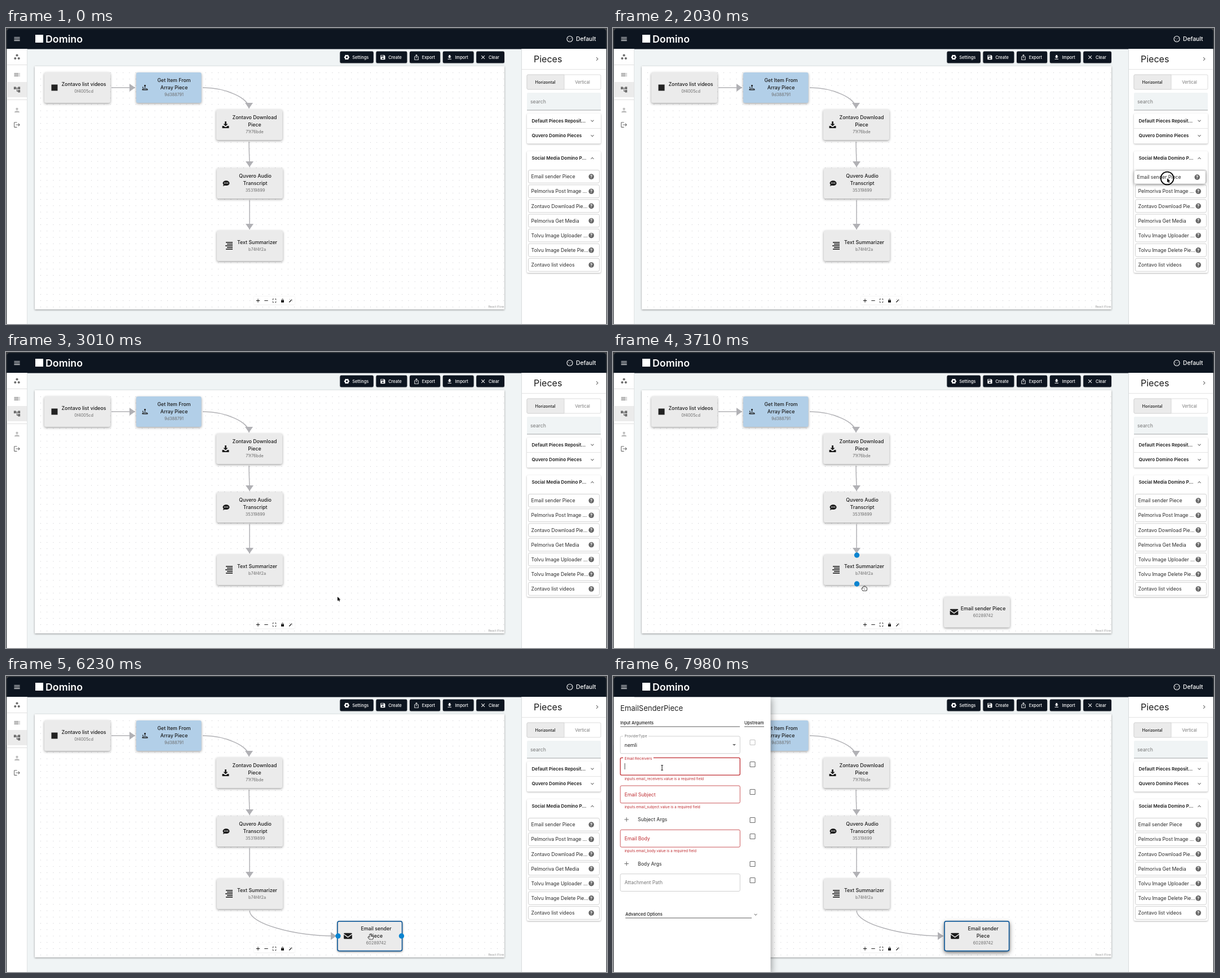
Recreate the animation shown at these times as an HTML page with a canvas. Size 1066 by 526 pixels, loop 8000 ms.

```html
<!DOCTYPE html>
<html lang="en">
<head>
<meta charset="utf-8">
<title>Workflow editor</title>
<style>
html, body { margin: 0; width: 100%; height: 100%; overflow: hidden; background: #f0f4f5; }
canvas { display: block; width: 1066px; height: 526px; }
</style>
</head>
<body>
<canvas id="stage"></canvas>
<script>
const W = 1066, H = 526, LOOP = 8000, STEP = 70;
const canvas = document.getElementById('stage');
const c = canvas.getContext('2d');
const dpr = window.devicePixelRatio || 1;
canvas.width = W * dpr;
canvas.height = H * dpr;

const INK = '#1c1c1c', DARK = '#0d1520', RED = '#bf2c31', BLUE = '#0a84d0', EDGE = '#b1b1b5', GREY = '#6c6c6c';

const ICONS = {
  menu: 'M3 18h18v-2H3zM3 13h18v-2H3zM3 6v2h18V6z',
  toc: 'M3 9h14V7H3zM3 13h14v-2H3zM3 17h14v-2H3zM19 17h2v-2h-2zM19 7v2h2V7zM19 13h2v-2h-2z',
  tree: 'M22 11V3h-7v3H9V3H2v8h7V8h2v10h4v3h7v-8h-7v3h-2V8h2v3z',
  person: 'M12 12a4 4 0 1 0 0-8 4 4 0 0 0 0 8zm0 2c-2.7 0-8 1.3-8 4v2h16v-2c0-2.7-5.3-4-8-4z',
  logout: 'M17 7l-1.4 1.4L18.2 11H8v2h10.2l-2.6 2.6L17 17l5-5zM4 5h8V3H4a2 2 0 0 0-2 2v14a2 2 0 0 0 2 2h8v-2H4z',
  save: 'M17 3H5a2 2 0 0 0-2 2v14a2 2 0 0 0 2 2h14a2 2 0 0 0 2-2V7zM12 19a3 3 0 1 1 0-6 3 3 0 0 1 0 6zM15 9H5V5h10z',
  share: 'M16 5l-1.4 1.4-1.6-1.6V16h-2V4.8L9.4 6.4 8 5l4-4zM20 10v11a2 2 0 0 1-2 2H6a2 2 0 0 1-2-2V10a2 2 0 0 1 2-2h3v2H6v11h12V10h-3V8h3a2 2 0 0 1 2 2z',
  load: 'M5 20h14v-2H5zM19 9h-4V3H9v6H5l7 7z',
  clear: 'M19 6.4L17.6 5 12 10.6 6.4 5 5 6.4 10.6 12 5 17.6 6.4 19 12 13.4 17.6 19 19 17.6 13.4 12z',
  more: 'M16.6 8.6L12 13.2 7.4 8.6 6 10l6 6 6-6z',
  plus: 'M19 13h-6v6h-2v-6H5v-2h6V5h2v6h6z',
  minus: 'M19 13H5v-2h14z',
  mail: 'M1 6a2 2 0 0 1 2-2h18a2 2 0 0 1 2 2l-11 8zM1 8.5l11 8 11-8V18a2 2 0 0 1-2 2H3a2 2 0 0 1-2-2z',
  chat: 'M12 3C6 3 1 6.6 1 11.2c0 2 .9 3.8 2.4 5.2C3 18.5 1.5 20.5 1 21c2.5 0 4.6-.9 6-2 1.5.5 3.2.6 5 .6 6 0 11-3.6 11-8.2S18 3 12 3z',
  tray: 'M9.5 1h5v8h5L12 16.5 4.5 9h5zM1 15.5h5l4 4h4l4-4h5V23H1z',
  pick: 'M12 1a3.5 3.5 0 0 1 1 6.8V14h5l5 4v4H1v-4l5-4h5V7.8A3.5 3.5 0 0 1 12 1zM7 16l-3 2.5h16L17 16zM4 8l3 3H5v3H3v-3H1z',
  fit: 'M3 3h6v2H5v4H3zM15 3h6v6h-2V5h-4zM3 15h2v4h4v2H3zM19 15h2v6h-6v-2h4z',
  lock: 'M5 10h2V8a5 5 0 0 1 10 0v2h2v11H5zM9 10h6V8a3 3 0 0 0-6 0z',
  wand: 'M3 19L14 8l2.5 2.5-11 11zM15 7l2-2 2.5 2.5-2 2zM19 1v4M7 4l3 1-2 2zM19 12l3 1-2 2z',
  drop: 'M6 9h12l-6 6z'
};
for (const k in ICONS) ICONS[k] = new Path2D(ICONS[k]);

function text(s, x, y, size, color = INK, weight = 400, align = 'left') {
  c.font = `${weight} ${size}px Inter, "Open Sans", sans-serif`;
  c.fillStyle = color;
  c.textAlign = align;
  c.fillText(s, x, y + size * 0.36);
}

function icon(name, x, y, size, color = INK, turn = 0) {
  c.save();
  c.translate(x, y);
  c.rotate(turn);
  c.scale(size / 24, size / 24);
  c.translate(-12, -12);
  c.fillStyle = color;
  c.fill(ICONS[name], 'evenodd');
  c.restore();
}

function box(x, y, w, h, r, fill, stroke, lw = 1) {
  c.beginPath();
  c.roundRect(x, y, w, h, r);
  if (fill) { c.fillStyle = fill; c.fill(); }
  if (stroke) { c.strokeStyle = stroke; c.lineWidth = lw; c.stroke(); }
}

function shaded(blur, dy, alpha, draw) {
  c.save();
  c.shadowColor = `rgba(0,0,0,${alpha})`;
  c.shadowBlur = blur * dpr;
  c.shadowOffsetY = dy * dpr;
  draw();
  c.restore();
}

function line(x1, y1, x2, y2, color, lw = 1) {
  c.beginPath();
  c.moveTo(x1, y1);
  c.lineTo(x2, y2);
  c.strokeStyle = color;
  c.lineWidth = lw;
  c.stroke();
}

function dot(x, y, r, color) {
  c.beginPath();
  c.arc(x, y, r, 0, 7);
  c.fillStyle = color;
  c.fill();
}

function ring(x, y, r, color, lw) {
  c.beginPath();
  c.arc(x, y, r, 0, 7);
  c.strokeStyle = color;
  c.lineWidth = lw;
  c.stroke();
}

function helpIcon(x, y) {
  dot(x, y, 4.8, '#666');
  text('?', x, y, 7.5, '#fff', 700, 'center');
}

function header() {
  c.fillStyle = '#3b3e42';
  c.fillRect(0, 0, W, H);
  box(1.5, 37, 1063, 489, 0, '#f0f4f5');
  box(1.5, 1.5, 1063, 36, [5, 5, 0, 0], DARK);
  icon('menu', 19.5, 19.5, 13.5, '#fff');
  c.fillStyle = '#fff';
  c.fillRect(52, 12, 14, 14);
  text('Domino', 70, 19.5, 17.8, '#fff', 600);
  ring(1000, 19.5, 5, '#fff', 1.1);
  for (const [x, y] of [[-2, -1], [2, -1], [0, 2]]) dot(1000 + x, 19.5 + y, 0.6, '#fff');
  text('Default', 1011, 19.5, 10.3, '#fff', 500);
}

function sidebar() {
  c.fillStyle = '#fff';
  c.fillRect(1.5, 37, 36, 489);
  c.fillStyle = '#ebebeb';
  c.fillRect(1.5, 96, 36, 27);
  line(37.5, 37, 37.5, H, '#dfe2e3');
  line(2, 65.5, 37, 65.5, '#e0e0e0');
  line(2, 127.5, 37, 127.5, '#e0e0e0');
  for (const [x, y] of [[19.5, 48.5], [16.3, 54], [22.7, 54]]) dot(x, y, 2.1, GREY);
  icon('toc', 19.5, 83, 13.5, GREY);
  icon('tree', 19.5, 109.5, 13.5, GREY);
  icon('person', 19.5, 146, 13, '#bdbdbd');
  icon('logout', 19.5, 172, 13, GREY);
}

function toolbar() {
  const buttons = [['Settings', 592.4, 59.4], ['Create', 656.4, 55, 'save'], ['Export', 716, 54.2, 'share'],
    ['Import', 774.8, 54.8, 'load'], ['Clear', 834.2, 49.8, 'clear']];
  for (const [label, x, w, name] of buttons) {
    shaded(2, 0.8, 0.3, () => box(x, 41.6, w, 20.6, 2.3, DARK));
    if (name) icon(name, x + 12, 52, 11, '#fff');
    else {
      ring(x + 12, 52, 2.8, '#fff', 2.2);
      for (let a = 0; a < 6.2; a += Math.PI / 3) {
        const p = Math.cos(a), q = Math.sin(a);
        line(x + 12 + p * 3, 52 + q * 3, x + 12 + p * 4.6, 52 + q * 4.6, '#fff', 2);
      }
    }
    text(label, x + 21.8, 52, 7.4, '#fff', 500);
  }
}

function board() {
  shaded(3, 1, 0.4, () => { c.fillStyle = '#fff'; c.fillRect(51, 68, 833, 432); });
  const gap = 11.25;
  for (let y = 79.5; y < 500; y += gap)
    for (let x = 61.5; x < 884; x += gap) dot(x, y, 0.55, '#bdbdc2');
  text('React Flow', 883, 495, 5.3, '#999', 400, 'right');
}

function controls() {
  shaded(2, 0, 0.1, () => { c.fillStyle = '#fff'; c.fillRect(440, 477, 72, 14.5); });
  ['plus', 'minus', 'fit', 'lock', 'wand'].forEach((n, i) =>
    icon(n, 447 + i * 14.5, 484.5, i < 2 ? 11 : 8.5, '#111'));
}

function node(x, y, w, h, cx, lines, id, fill = '#ebebeb') {
  shaded(4, 1.5, 0.38, () => box(x, y, w, h, 3, fill));
  const top = y + h / 2 - (lines.length - 1) * 6.4 - 6.6;
  lines.forEach((s, i) => text(s, cx, top + i * 12.7, 8.8, INK, 500, 'center'));
  text(id, cx, top + lines.length * 12.7, 7.3, '#6d6d6d', 400, 'center');
}

function curve(x1, y1, ax, ay, bx, by, x2, y2) {
  c.beginPath();
  c.moveTo(x1, y1);
  c.bezierCurveTo(ax, ay, bx, by, x2, y2);
  c.strokeStyle = EDGE;
  c.lineWidth = 1.5;
  c.stroke();
}

function arrowHead(x, y, turn) {
  c.save();
  c.translate(x, y);
  c.rotate(turn);
  c.beginPath();
  c.moveTo(0, 0);
  c.lineTo(-10, -7);
  c.lineTo(-10, 7);
  c.fillStyle = EDGE;
  c.fill();
  c.restore();
}

// Each control point sits halfway along the axis its end leaves on.
function edge(x1, y1, x2, y2, outDown, inDown) {
  const mx = (x1 + x2) / 2, my = (y1 + y2) / 2;
  curve(x1, y1, outDown ? x1 : mx, outDown ? my : y1, inDown ? x2 : mx, inDown ? my : y2, x2, y2);
}

function arrow(x1, y1, x2, y2, outDown, inDown) {
  edge(x1, y1, x2, y2, outDown, inDown);
  arrowHead(x2, y2, inDown ? Math.PI / 2 : 0);
}

function graph() {
  arrow(187, 106, 229, 106, false, false);
  arrow(349, 106, 431, 143, false, true);
  arrow(431, 202, 432, 247, true, true);
  arrow(432, 306, 432, 358, true, true);

  node(68, 79, 117, 54, 138, ['Zontavo list videos'], '0f4005cd');
  c.fillStyle = '#222';
  c.fillRect(80.5, 100.5, 11, 11);
  node(231, 79, 115.5, 54, 298, ['Get Item From', 'Array Piece'], '9d388791', '#b2cfe8');
  icon('pick', 246.5, 106, 11);
  node(373, 145, 117, 54, 441, ['Zontavo Download', 'Piece'], '71f76bde');
  icon('tray', 389.5, 172, 13);
  node(374, 249, 117, 54, 442, ['Quvero Audio', 'Transcript'], '35319899');
  icon('chat', 390.5, 276, 13);
  for (let i = -1; i < 2; i++) dot(390.5 + i * 2.7, 275.5, 0.9, '#ebebeb');
  node(374, 360, 117, 54, 445.5, ['Text Summarizer'], 'b74f4f2a');
  for (let i = 0; i < 5; i++) {
    const left = i === 2 ? 389 : i % 2 ? 392 : 390;
    line(left, 381 + i * 3, 402, 381 + i * 3, INK, 1.6);
  }
}

function handles(...points) {
  for (const [x, y] of points) dot(x, y, 4.7, BLUE);
}

function emailNode(t) {
  if (t < 3080) return;
  if (t < 6160) node(587, 435, 117, 54.5, 656.5, ['Email sender Piece'], '60289742');
  else {
    const glow = Math.min(1, Math.max(0, (t - 6230) / 210));
    shaded(3 + 7 * glow, 1 + 2 * glow, 0.2 + 0.25 * glow, () => box(588, 436, 115, 53, 3, '#ebebeb'));
    node(588, 435.5, 115, 53, 656.5, ['Email sender', 'Piece'], '60289742');
    box(588, 435.8, 114.6, 52.8, 3, null, '#165e9c', 1.7);
  }
  icon('mail', t < 6160 ? 605 : 606.5, 462, 16);
}

function item(label, x, y, lifted) {
  if (lifted) shaded(6, 1.5, 0.4, () => box(x, y, 126, 23, 2.5, '#fff'));
  box(x, y, 126, 23, 2.5, '#fff', lifted ? '#ddd' : '#c6c6c6', 0.8);
  text(label, x + 5, y + 11.6, 8.7, '#2b2b2b');
  helpIcon(x + 111.7, y + 11.6);
}

function panel() {
  c.fillStyle = '#fff';
  c.fillRect(914.5, 37, 150, 489);
  line(914.5, 37, 914.5, H, '#d9dcdd');
  text('Pieces', 936, 55.5, 16, INK);
  icon('more', 1048.5, 55, 13, GREY, -Math.PI / 2);
  line(915, 73.5, 1064, 73.5, '#e4e4e4');

  box(924, 83, 131, 26, 2, '#fff', '#dcdcdc');
  box(924, 83, 66, 26, [2, 0, 0, 2], '#ebebeb', '#d6d6d6');
  text('Horizontal', 956.5, 96, 7.3, INK, 500, 'center');
  text('Vertical', 1022.5, 96, 7.4, '#777', 400, 'center');

  box(924, 115, 131, 31, [2, 2, 0, 0], '#f0f4f5');
  line(924, 146, 1055, 146, '#8b8f91', 0.8);
  text('search', 930, 130.5, 8.7, '#777');

  shaded(3, 1, 0.3, () => box(924, 152, 131, 53.5, 2, '#fff'));
  line(924, 178.5, 1055, 178.5, '#e4e4e4');
  shaded(3, 1, 0.3, () => box(924, 219, 131, 216, 2, '#fff'));
  ['Default Pieces Reposit...', 'Quvero Domino Pieces', 'Social Media Domino P...'].forEach((s, i) => {
    const y = [165, 191.5, 231.5][i];
    text(s, 932.5, y, 8.1, INK, 600);
    icon('more', 1040, y, 11.5, GREY, i === 2 ? Math.PI : 0);
  });
  ['Email sender Piece', 'Pelmoriva Post Image ...', 'Zontavo Download Pie...', 'Pelmoriva Get Media',
    'Tolvu Image Uploader ...', 'Tolvu Image Delete Pie...', 'Zontavo list videos']
    .forEach((s, i) => item(s, 926.5, 252.5 + i * 26.15));
}

function notchLabel(s, y, color, size) {
  c.font = `400 ${size}px Inter, "Open Sans", sans-serif`;
  c.fillStyle = '#fff';
  c.fillRect(18, y - 4, c.measureText(s).width + 5, 8);
  text(s, 20.5, y, size, color);
}

function field(y, label, color, border, lw = 0.8) {
  box(13, y, 212.3, 30.8, 2.3, '#fff', border, lw);
  text(label, 20.5, y + 15.5, 8.65, color);
}

function drawer(t) {
  if (t < 6580) return;
  c.save();
  c.beginPath();
  c.rect(1.5, 37.5, W, H);
  c.clip();
  shaded(12, 3, 0.45, () => { c.fillStyle = '#fff'; c.fillRect(1.5, 37, 278, 489); });
  c.restore();

  text('EmailSenderPiece', 13, 57.5, 13, '#222');
  text('Input Arguments', 13, 83, 7.45, INK, 500);
  text('Upstream', 233, 83, 7.45, INK, 500);
  line(13, 90, 225, 90, '#333', 0.8);
  line(233, 90, 268, 90, '#333', 0.8);

  field(107, '', INK, '#c4c4c4');
  notchLabel('ProviderType', 107, '#777', 6.4);
  text('nemli', 20.5, 122.5, 8.8, '#222');
  icon('drop', 215, 122.5, 12, GREY);

  const focus = Math.min(1, Math.max(0, (t - 7700) / 210));
  field(145.3, '', RED, RED, focus ? 1.3 : 0.8);
  const size = 8.65 - 2.1 * focus, labelY = 161 - 14.7 * focus;
  if (focus === 1) notchLabel('Email Receivers', labelY, RED, size);
  else text('Email Receivers', 20.5, labelY, size, RED);
  if (focus) line(21, 155, 21, 166, '#222', 0.8);

  field(195, 'Email Subject', RED, RED);
  field(273.3, 'Email Body', RED, RED);
  field(351.7, 'Attachment Path', '#777', '#c4c4c4');
  ['receivers', 'subject', 'body'].forEach((s, i) =>
    text(`inputs.email_${s}.value is a required field`, 20.5, [183, 232.5, 311][i], 6.45, RED));
  ['Subject Args', 'Body Args'].forEach((s, i) => {
    const y = 255 + i * 78.5;
    icon('plus', 24, y, 13, GREY);
    text(s, 44, y, 8.65, '#222');
  });
  [118, 157, 206, 256, 285, 334, 363].forEach((y, i) =>
    box(243, y - 4.5, 9, 9, 1, null, i ? GREY : '#c4c4c4', 1.1));
  text('Advanced Options', 22, 423, 7.45, INK, 500);
  line(22, 430, 246, 430, '#333', 0.8);
  icon('more', 253, 424, 11, GREY);
}

// time, x, y
const PATH = [[350, 607, 530], [1050, 993, 263], [1890, 993, 263], [2030, 983, 267],
  [2870, 588, 435], [3010, 588, 435], [3710, 446, 421], [3850, 433, 412], [4130, 433, 412],
  [4620, 556, 470], [4760, 560, 471], [5110, 584, 471], [5390, 584, 471], [5810, 647, 464],
  [6860, 647, 464], [7700, 87, 171], [7910, 87, 163]];

function pointerAt(t) {
  let i = 0;
  while (i < PATH.length - 1 && PATH[i + 1][0] <= t) i++;
  const a = PATH[i], b = PATH[i + 1] || a;
  const u = b === a ? 0 : Math.max(0, (t - a[0]) / (b[0] - a[0]));
  const e = u * u * (3 - 2 * u);
  return [a[1] + (b[1] - a[1]) * e, a[2] + (b[2] - a[2]) * e];
}

const ARROW = new Path2D('M0 0V9.3L2.2 7.3 3.6 10.4 5.2 9.7 3.8 6.7H6.7z');
const HANDS = {
  open: 'M-2.5 2L-4 -.5M-1.8 1V-3M0 1V-3.8M1.8 1V-3.2M3.4 1.5V-1.5M-1.5 2.5H2.5',
  fist: 'M-2.8 1.5V0M-1.8 1V-1.5M0 1V-2M1.8 1V-1.6M3.2 1.5V-1M-1.5 2.5H2.5',
  finger: 'M-2.3 2.2L-3.8 .5M-1.2 1.5V-4M.6 1.5V-.8M2 1.5V-.5M3.3 1.8V0M-1 3H2.5'
};
for (const k in HANDS) HANDS[k] = new Path2D(HANDS[k]);

function pointer(t, x, y) {
  if (t < 420) return;
  c.save();
  c.translate(x, y);
  c.lineJoin = c.lineCap = 'round';
  const onBoard = x > 51 && x < 884 && y > 68 && y < 500;
  if (t >= 6580 && x < 225 && y > 145 && y < 176) {
    line(0, -4, 0, 4, '#111', 1);
    line(-1.5, -4.3, 1.5, -4.3, '#111', 0.9);
    line(-1.5, 4.3, 1.5, 4.3, '#111', 0.9);
  } else if (t >= 6580 || t < 3080 && !(t < 1050 && onBoard)) {
    c.scale(0.8, 0.8);
    c.strokeStyle = '#fff';
    c.lineWidth = 2;
    c.stroke(ARROW);
    c.fillStyle = '#000';
    c.fill(ARROW);
  } else {
    const shape = HANDS[t >= 5250 ? 'finger' : t >= 4060 ? 'fist' : 'open'];
    c.strokeStyle = '#222';
    c.lineWidth = 3.2;
    c.stroke(shape);
    c.strokeStyle = '#fff';
    c.lineWidth = 1.6;
    c.stroke(shape);
  }
  c.restore();
}

function render(t) {
  const [x, y] = pointerAt(t);
  c.setTransform(dpr, 0, 0, dpr, 0, 0);
  header();
  sidebar();
  toolbar();
  board();
  graph();
  if (t >= 5250) arrow(432, 417, 586, 462, true, false);
  else if (t >= 4130) edge(432, 416, x, y, true, true);
  emailNode(t);
  if (t >= 3570 && t < 4340) handles([432.5, 361], [432.5, 412]);
  if (t >= 4410 && t < 7000) handles([589, 462], [701.5, 462]);
  controls();
  panel();
  drawer(t);
  if (t >= 1960 && t < 3010) item('Email sender Piece', x - 58.5, y - 13.5, true);
  if (t >= 1400 && t < 3010) ring(x, y, 11.4, '#000', 1.8);
  if (t >= 3990 && t < 5110) ring(x, y, 15.8, '#000', 1.8);
  pointer(t, x, y);
}

function tick() {
  const t = performance.now() % LOOP;
  render(Math.floor(t / STEP) * STEP);
  requestAnimationFrame(tick);
}
tick();
</script>
</body>
</html>
```
